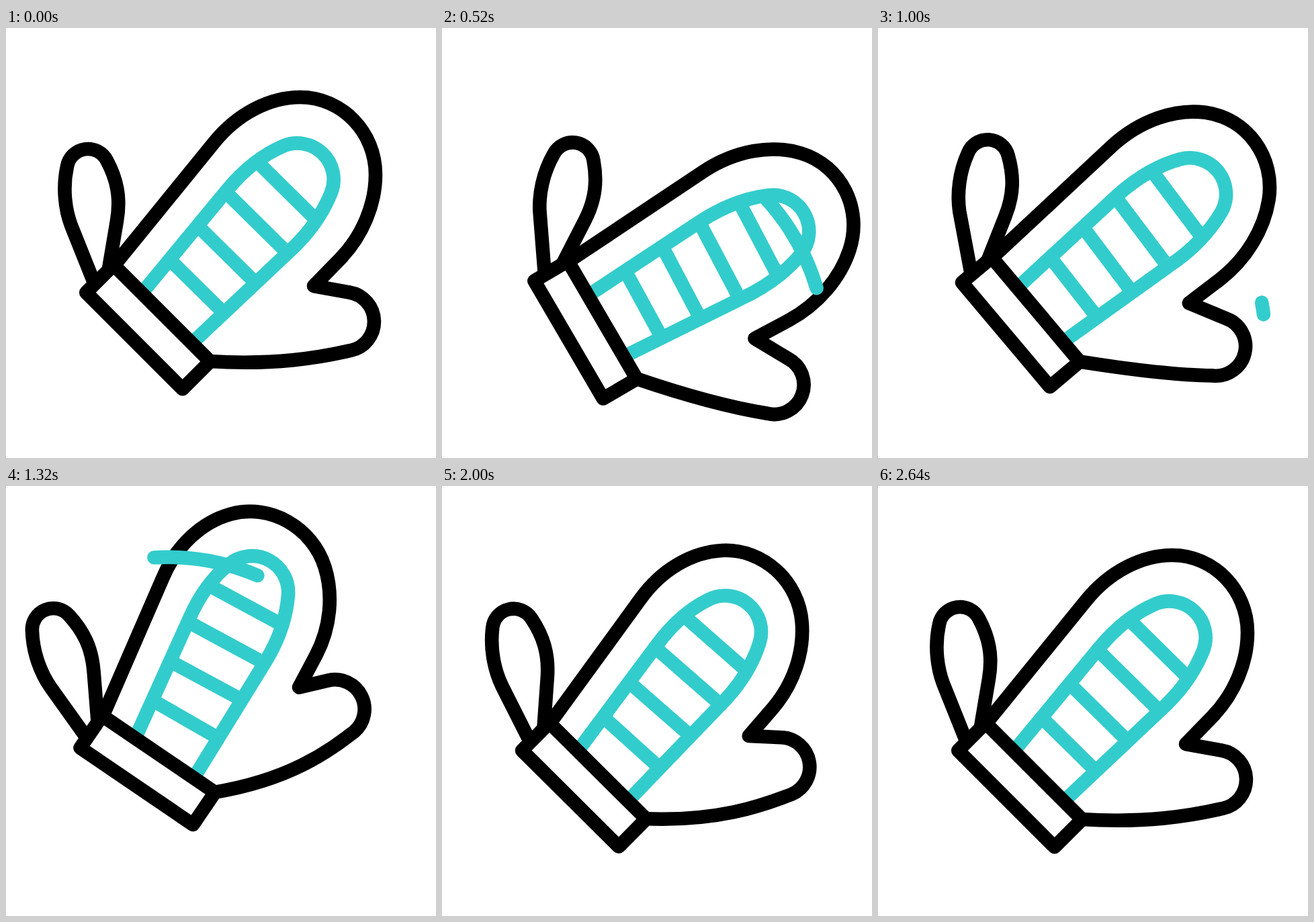
Recreate the animation shown at these times as an HTML page. Size 640x640 px, loop 3000 ms.

```html
<!DOCTYPE html>
<html lang="en">
<head>
<meta charset="utf-8">
<title>Oven mitt</title>
<style>
html, body { margin: 0; width: 100%; height: 100%; overflow: hidden; background: #fff; }
svg { display: block; width: 100vw; height: 100vh; }
path, rect { fill: none; stroke: #000; stroke-width: 20.6; stroke-linejoin: round; }
.teal { stroke: #33cccc; }
.round { stroke-linecap: round; }
</style>
</head>
<body>
<svg viewBox="0 0 640 640">
  <g id="rig">
    <path id="bars" class="teal"/>
    <path id="palm" class="teal"/>
    <path id="loop"/>
    <path id="mitt"/>
    <rect x="-101.5" y="-29" width="203" height="58" transform="rotate(45)" style="fill:#fff"/>
    <path id="swish" class="teal round"/>
  </g>
</svg>
<script>
const LOOP_MS = 3000;
const CUFF = [211.5, 445];   // cuff centre, the pivot of the swing
const HINGE = [264, 392];    // where the fabric bends
const THUMB = [452, 441];    // where the thumb curls
const HOOK = [143, 366];     // where the loop is sewn on

// resting outlines; A takes a radius and an end point
const mitt = `M162 352 L310 170 C345 127 393 103 438 103 C500 103 550 155 550 218
  C550 262 531 309 497 344 L458 384 L511 393.5 A44 513 480 C465 491 400 502 302 496`;
const palm = `M204 392.5 L330 240 C356 209 384 188 412 176 A54 484 245
  C472 275 450 307 420 334 L279 467`;
const loop = `M133 384 L97 294 C88 270 84 238 91 206 A31.5 150 197
  C165 225 171 252 165 287 L151 370`;
let bars = '';
for (let i = 0; i < 4; i++) {
  bars += `M${246 + 43 * i} ${347 - 49 * i} L${320 + 46 * i} ${420 - 46 * i} `;
}

const el = id => document.getElementById(id);
const rad = deg => deg * Math.PI / 180;
const clamp = x => Math.min(1, Math.max(0, x));
const ease = x => (1 - Math.cos(Math.PI * clamp(x))) / 2;

// from rest to one side, to the other side, and back to rest
function swing(t, [t0, t1, t2, t3], a, b) {
  return a * ease((t - t0) / (t1 - t0)) +
    (b - a) * ease((t - t1) / (t2 - t1)) - b * ease((t - t2) / (t3 - t2));
}

function turn([x, y], [cx, cy], deg) {
  const c = Math.cos(rad(deg)), s = Math.sin(rad(deg));
  const dx = x - cx, dy = y - cy;
  return [cx + dx * c - dy * s, cy + dx * s + dy * c];
}

// bend grows away from the cuff; the tip stretches and the thumb curls with it
function bendFabric([x, y], bend) {
  const out = (x - CUFF[0] - y + CUFF[1]) * Math.SQRT1_2;
  const pull = .007 * bend * Math.max(0, out - 200) * Math.SQRT1_2;
  const p = turn([x, y], THUMB, 1.5 * bend * ease((x + y - 842) / 60));
  return turn([p[0] + pull, p[1] - pull], HINGE, bend * ease((out - 30) / 100));
}

const bendLoop = (p, bend) => turn(p, HOOK, bend * clamp((HOOK[1] - p[1]) / 70));

function draw(id, shape, warp, bend) {
  const d = shape.replace(/([MLCA])([^MLCA]+)/g, (_, cmd, rest) => {
    const n = rest.trim().split(/\s+/).map(Number);
    let out = cmd;
    if (cmd === 'A') {
      const r = n.shift();
      out += `${r} ${r} 0 0 1 `;
    }
    for (let i = 0; i < n.length; i += 2) {
      const [x, y] = warp([n[i], n[i + 1]], bend);
      out += `${(x - CUFF[0]).toFixed(2)} ${(y - CUFF[1]).toFixed(2)} `;
    }
    return out;
  });
  el(id).setAttribute('d', d);
}

// a stroke along a circle: it runs forward, waits, and runs back
function drawSwish(t) {
  const sweep = (out, back) => ease((t - out) / 420) - ease((t - back) / 388);
  const tail = .5 + 74.2 * (t < 1010 ? sweep(330, 1010) : sweep(0, 1010));
  const head = .5 + 77.2 * sweep(240, 1110);
  const at = deg => turn([24, -312], [24, 31], deg).map(v => v.toFixed(2)).join(' ');
  const shown = head - tail > .02;
  el('swish').setAttribute('d', shown ? `M${at(tail)} A343 343 0 0 1 ${at(head)}` : '');
}

function render(t) {
  const beat = [130, 680, 1360, 2060];
  const angle = swing(t, beat, 18.2, -11);
  const x = CUFF[0] + swing(t, beat, 2.6, -.8);
  const y = CUFF[1] + swing(t, beat, 5.3, -22.3);
  el('rig').setAttribute('transform', `translate(${x} ${y}) rotate(${angle})`);

  // fabric and loop follow the cuff a little late
  const fabric = swing(t, [145, 720, 1385, 2260], 24, -17.2) - angle;
  const strap = swing(t, [180, 740, 1400, 2420], 26.5, -15.7) - angle;
  draw('bars', bars, bendFabric, fabric);
  draw('palm', palm, bendFabric, fabric);
  draw('mitt', mitt, bendFabric, fabric);
  draw('loop', loop, bendLoop, strap);
  drawSwish(t);
}

function tick() {
  render(performance.now() % LOOP_MS);
  requestAnimationFrame(tick);
}
tick();
</script>
</body>
</html>
```
